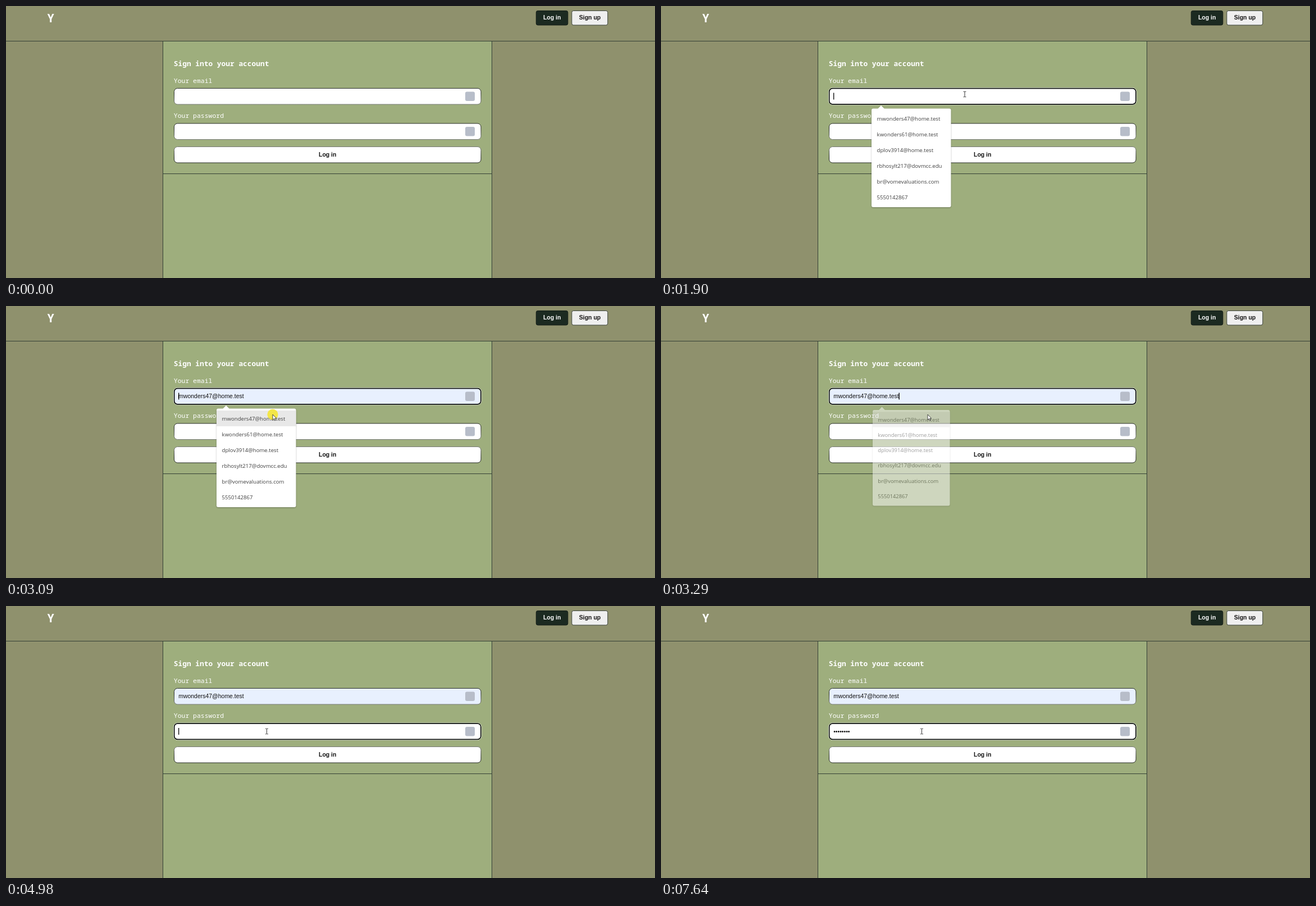
Recreate the animation shown at these times as an HTML page. Size 1156x484 px, loop 8000 ms.

```html
<!DOCTYPE html>
<html lang="en">
<head>
<meta charset="utf-8">
<title>Sign in</title>
<style>
  html, body { margin: 0; width: 100%; height: 100%; overflow: hidden; background: #8f916d; }
  svg { display: block; width: 100%; height: 100%; }
  text { font: 10.48px "Liberation Sans", Arial, sans-serif; fill: #111; white-space: pre; }
  .bold { font-weight: 700; }
  .mid { text-anchor: middle; }
  .mono { font-family: "Noto Sans Mono", monospace; fill: #fff; }
  .brand { font-size: 21.3px; font-weight: 700; }
  .title { font-size: 12.85px; font-weight: 700; }
  .label { font-size: 11.45px; font-weight: 500; }
  .line { stroke: #344036; fill: none; }
  .ring { fill: none; visibility: hidden; }
  #menu { transform-origin: 446px 270px; filter: drop-shadow(0 1px 1px rgba(0, 0, 0, .3)); }
  #menu text { font: 9.6px "Open Sans", sans-serif; fill: #404040; }
</style>
</head>
<body>
<svg viewBox="0 0 1156 484" xmlns="http://www.w3.org/2000/svg">
  <defs>
    <linearGradient id="inset" x1="0" y1="0" x2="0" y2="1">
      <stop offset=".3" stop-color="#2b302b"/><stop offset="1" stop-color="#777b77"/>
    </linearGradient>
    <linearGradient id="outset" x1="0" y1="0" x2="0" y2="1">
      <stop offset="0" stop-color="#777b77"/><stop offset=".7" stop-color="#222722"/>
    </linearGradient>
  </defs>

  <rect width="1156" height="484" fill="#8f916d"/>
  <rect x="280" y="63" width="585" height="421" fill="#9eae7d"/>
  <path class="line" d="M0 62.5H1156M279.5 63V484M865.5 63V484M280 298.5H865"/>

  <text class="mono brand" x="73.3" y="29">Y</text>
  <rect x="944.3" y="8.5" width="56.5" height="25.5" rx="3" fill="#1c2a21" stroke="#141d17"/>
  <text class="bold mid" x="972.6" y="24.3" style="fill:#fff">Log in</text>
  <rect x="1007.8" y="8.5" width="64" height="25.5" rx="3" fill="#efefef" stroke="#3c443c"/>
  <text class="bold mid" x="1040" y="24.3">Sign up</text>

  <text class="mono title" x="298.8" y="106.6">Sign into your account</text>
  <text class="mono label" x="298.8" y="136.6">Your email</text>
  <text class="mono label" x="298.8" y="199.1">Your password</text>

  <g id="fields"></g>
  <rect x="299.5" y="250.5" width="546.5" height="28.5" rx="6" fill="#fff" stroke="url(#outset)"/>
  <text class="bold mid" x="572.7" y="268.4">Log in</text>

  <text id="email" x="307.2" y="164.2"></text>
  <text id="dots" x="307.2" y="226.6"></text>
  <rect id="caret" width="1.3" height="12" fill="#000"/>

  <g id="menu">
    <path d="M386 183l6-6 6 6z" fill="#fff"/>
    <rect x="375" y="182.5" width="141.5" height="175.5" rx="3" fill="#fff"/>
    <rect id="hover" x="375" y="186" width="141.5" height="28" fill="#e8e8e8"/>
  </g>

  <circle id="click" r="9.6" fill="#f4e52a" fill-opacity=".85"/>
  <g id="pointer">
    <path id="arrow" d="M0 0V9.6L2.2 7.6L3.7 11L5.2 10.3L3.7 7H6.6Z" fill="#fff" stroke="#222" stroke-width=".8"/>
    <path id="beam" d="M-2.4 -4.8H-.7L0 -4.2L.7 -4.8H2.4M0 -4.2V4.2M-2.4 4.8H-.7L0 4.2L.7 4.8H2.4" fill="none" stroke="#333" stroke-width="1"/>
  </g>
</svg>

<script>
const LOOP = 8000;
const $ = id => document.getElementById(id);
const el = (parent, tag, attrs, text = "") => {
  const node = document.createElementNS("http://www.w3.org/2000/svg", tag);
  for (const key in attrs) node.setAttribute(key, attrs[key]);
  node.textContent = text;
  return parent.appendChild(node);
};
const show = (node, on) => { node.style.visibility = on ? "visible" : "hidden"; };
const within = (t, [from, to]) => t >= from && t < to;

const addresses = [
  "mwonders47@home.test", "kwonders61@home.test", "dplov3914@home.test",
  "rbhosylt217@dovmcc.edu", "br@vomevaluations.com", "5550142867"
];
addresses.forEach((address, i) => el($("menu"), "text", { x: 384.6, y: 204 + 28 * i }, address));

const fields = [146.5, 209].map(y => {
  const frame = (grow, attrs) => el($("fields"), "rect", {
    x: 299.5 - grow, y: y - grow, width: 546.5 + 2 * grow, height: 28.5 + 2 * grow, rx: 6 + grow, ...attrs
  });
  const box = frame(0, { fill: "#fff", stroke: "url(#inset)" });
  const rings = [
    frame(.8, { class: "ring", stroke: "#fff", "stroke-width": 1 }),
    frame(-.2, { class: "ring", stroke: "#0c100c", "stroke-width": 1.7 })
  ];
  el($("fields"), "rect", { x: 818, y: y + 6, width: 17, height: 16.6, rx: 3, fill: "#b7bdc9" });
  return { y, box, focus: on => rings.forEach(ring => show(ring, on)) };
});

$("email").textContent = addresses[0];
const emailWidth = $("email").getComputedTextLength();
$("dots").textContent = "•";
const dotWidth = $("dots").getComputedTextLength();

// Each move lasts from start to end and visits its points at an even pace.
const moves = [
  { start: 830, end: 1430, steps: 9, points: [[1018, 442], [850, 310], [700, 205], [590, 152], [552, 149], [541, 157]] },
  { start: 2285, end: 3020, steps: 11, points: [[541, 157], [533, 162], [512, 176], [488, 188], [477, 193], [475, 193]] },
  { start: 3440, end: 3830, steps: 6, points: [[475, 193], [473, 200], [468, 214], [464.5, 223]] }
];
const clicks = [[1830, 1900], [3090, 3220], [3900, 4060]];
const keyTimes = [5440, 5710, 6040, 6170, 6500, 6700, 6890, 7110];
const caretOff = [[0, 1830], [3750, 3900], [4450, 4980], [7640, LOOP]];
const menuFade = [[0, 0], [1830, .5], [1900, 1], [3220, .85], [3290, .5], [3360, .12], [3430, 0]];

function pointerAt(t) {
  const { start, end, steps, points } = moves.filter(m => t >= m.start).pop() || moves[0];
  const progress = Math.min(1, Math.max(0, Math.floor((t - start) / (end - start) * steps + 1e-6) / steps));
  const at = progress * (points.length - 1);
  const i = Math.min(Math.floor(at), points.length - 2);
  return points[i].map((v, axis) => v + (points[i + 1][axis] - v) * (at - i));
}

function render(t) {
  const [x, y] = pointerAt(t);
  const opacity = menuFade.filter(([time]) => t >= time).pop()[1];
  const overField = x > 299 && x < 846 && fields.some(f => y > f.y && y < f.y + 28.5)
    && !(opacity && y > 182);
  show($("pointer"), t >= 830);
  $("pointer").setAttribute("transform", `translate(${x} ${y})`);
  $("arrow").style.display = overField ? "none" : "";
  $("beam").style.display = overField ? "" : "none";
  $("click").setAttribute("cx", x);
  $("click").setAttribute("cy", y);
  show($("click"), clicks.some(span => within(t, span)));

  const filled = t >= 2685;
  show($("email"), filled);
  show($("hover"), filled);
  fields[0].box.setAttribute("fill", filled ? "#e8f0fe" : "#fff");
  fields[0].focus(within(t, [1830, 3900]));
  fields[1].focus(t >= 3900);

  $("menu").style.opacity = opacity;
  $("menu").style.transform = `scale(${.944 + .056 * opacity})`;

  const typed = keyTimes.filter(time => t >= time).length;
  $("dots").textContent = "•".repeat(typed);
  const onPassword = t >= 3900;
  const offset = onPassword ? typed * dotWidth : t >= 3220 ? emailWidth : 0;
  $("caret").setAttribute("x", 307 + offset);
  $("caret").setAttribute("y", onPassword ? 217 : 154.5);
  show($("caret"), !caretOff.some(span => within(t, span)));
}

const began = performance.now();
function tick() {
  render((performance.now() - began) % LOOP);
  requestAnimationFrame(tick);
}
tick();
</script>
</body>
</html>
```
